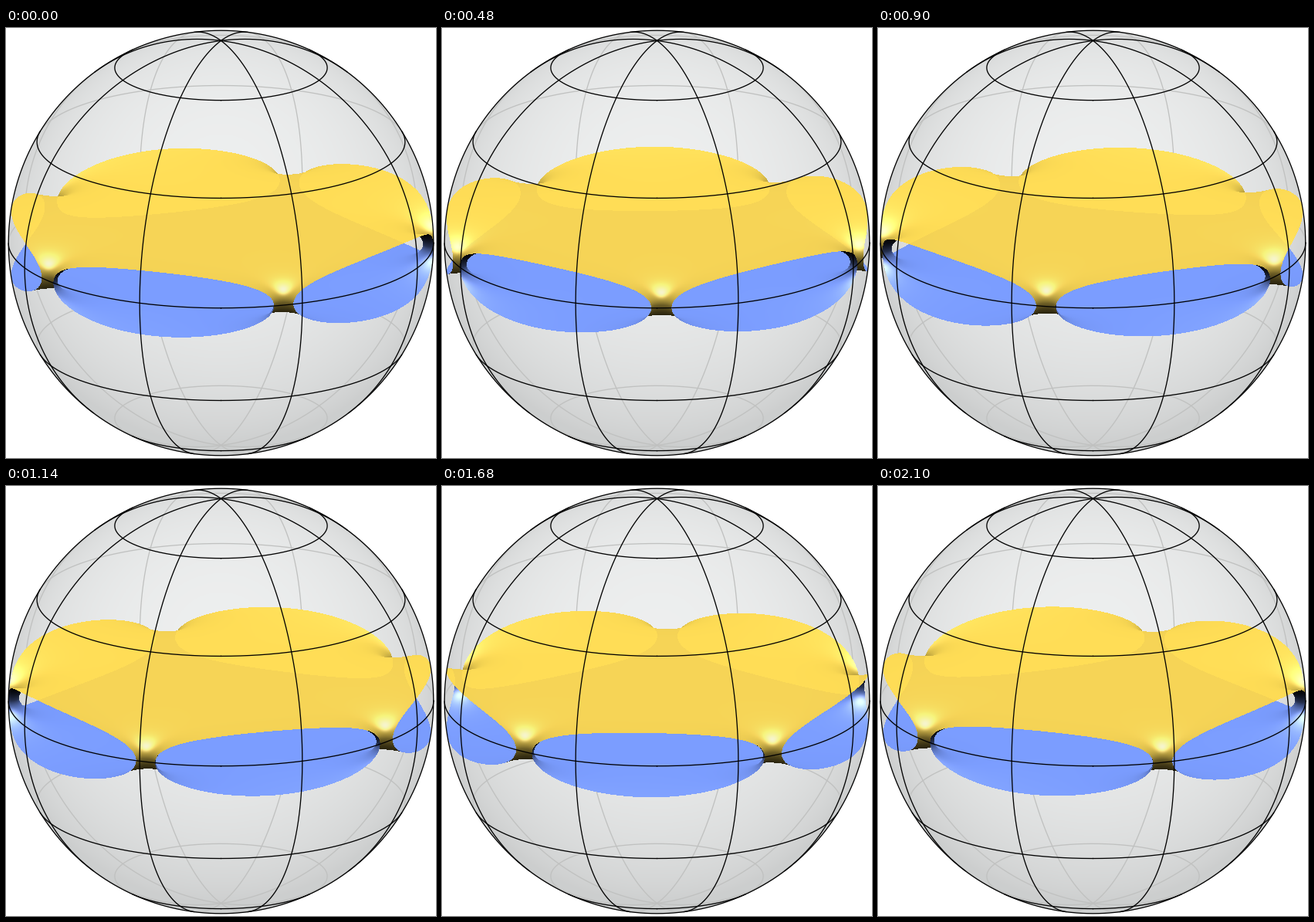
Animation of 557 by 557 pixels, one loop 2.16 s. Source, as a matplotlib script:

```python
import numpy as np
import matplotlib.pyplot as plt
from matplotlib.animation import FuncAnimation

SIZE, DPI = 557, 64
MID, RADIUS = 278.5, 275.3
SIN_E = 0.306                       # camera elevation
COS_E = np.sqrt(1 - SIN_E ** 2)
FRAMES, STEP_MS = 36, 60
TOP, BOTTOM = 140, 417              # pixel rows the surface can reach

N = 5                               # necks around the equator
NECK = 0.048                        # catenoid scale
SHIFT = -0.05
START, TURN = 17.2, -2.0            # neck azimuth and degrees per frame

YELLOW = np.array([255, 221, 86]) / 255
BLUE = np.array([123, 157, 255]) / 255
VIEW = np.array([0, -COS_E, SIN_E])
HALF = VIEW + [0, 0, 1]
HALF /= np.linalg.norm(HALF)

# Rays: X to the right, Y away from the camera, Z up
X = (np.arange(SIZE) + 0.5 - MID)[None, :] / RADIUS
V = (MID - np.arange(TOP, BOTTOM) - 0.5)[:, None] / RADIUS
inside = X ** 2 + V ** 2 < 1
reach = np.sqrt(np.clip(1 - X ** 2 - V ** 2, 0, None))
Y_in = V * SIN_E - reach * COS_E
Y_out = V * SIN_E + reach * COS_E
XX = np.broadcast_to(X, inside.shape)
VV = np.broadcast_to(V, inside.shape)


def height(v, y):
    return (v - y * SIN_E) / COS_E


def wall(z):
    return NECK * np.logaddexp(z / NECK, -z / NECK)


# Depth samples, shared by all rays of a row
STEP = 0.01
ys = np.arange(-1, 1 + STEP / 2, STEP)
STEPS = int(1.1 / STEP)
first_j = np.floor((V[:, 0] / SIN_E - 0.55 + 1) / STEP).astype(int)
index = first_j[None, :] + np.arange(STEPS)[:, None]
y_ray = -1 + index * STEP
wall_ray = wall(height(V[:, 0][None, :], y_ray))
index = np.clip(index, 0, len(ys) - 1)
valid = (y_ray[:, :, None] > Y_in) & (y_ray[:, :, None] < Y_out) & inside


def series(w):
    """Sum of w^(Nk) / (Nk - 1), with the logarithm split off."""
    q = w ** N
    total = np.zeros_like(q)
    for k in range(9, 0, -1):
        total = (total + 1 / (N * k * (N * k - 1))) * q
    return total - np.log(1 - q + 1e-12) / N


def potential(x, y, turn):
    """Half thickness of the doubled disc away from its necks."""
    f = series((x + 1j * y) / turn)
    return NECK * (N / 2 * (1 - 2 * f.real) + SHIFT)


def normal(x, y, z, turn):
    w = (x + 1j * y) / turn + 1e-9
    slope = series(w) / w + w ** (N - 1) / (1 - w ** N + 1e-12)
    grad = -N * NECK * np.conj(slope) * turn
    n = np.stack([-grad.real, -grad.imag, np.tanh(z / NECK)], axis=-1)
    return n / np.linalg.norm(n, axis=-1, keepdims=True)


def shade(n, base, ambient):
    up = n[:, 2]
    light = ambient + np.where(up > 0, 1 - ambient, 0.3) * up
    gloss = 0.5 * np.clip(n @ HALF, 0, 1) ** 25
    return np.clip(base * light[:, None] + gloss[:, None], 0, 1)


def render(i):
    turn = -1j * np.exp(1j * np.radians(START + TURN * i))
    grid = potential(X, ys[:, None], turn)

    def gap(x, v, y):
        return potential(x, y, turn) - wall(height(v, y))

    starts = gap(XX, VV, Y_in) > 0
    ends = gap(XX, VV, Y_out) > 0

    first = np.full(inside.shape, STEPS, dtype=np.uint8)
    for k in range(STEPS):
        flip = (grid[index[k]] > wall_ray[k][:, None]) != starts
        flip &= valid[k]
        first = np.minimum(first, np.where(flip, np.uint8(k), np.uint8(STEPS)))

    hit = inside & ((first < STEPS) | (starts != ends))
    rows, _ = np.nonzero(hit)
    k = first[hit].astype(int)
    x, v = XX[hit], VV[hit]
    y1 = np.where(k < STEPS, y_ray[np.minimum(k, STEPS - 1), rows], Y_out[hit])
    y0 = np.maximum(y1 - STEP, Y_in[hit])
    g0, g1 = gap(x, v, y0), gap(x, v, y1)
    diff = np.where(np.abs(g0 - g1) < 1e-9, 1e-9, g0 - g1)
    y = y0 + (y1 - y0) * np.clip(g0 / diff, 0, 1)

    n = normal(x, y, height(v, y), turn)
    inner = starts[hit]
    color = np.empty((len(x), 3))
    color[inner] = shade(-n[inner], BLUE, 0.3)
    color[~inner] = shade(n[~inner], YELLOW, 0.45)
    # The lower sheet shows faintly through the upper one
    double = ~inner & ~ends[hit]
    color[double] *= [0.965, 0.96, 1.0]

    image = np.zeros(inside.shape + (4,))
    image[hit, :3] = color
    image[hit, 3] = 1
    return image


def globe():
    p = (np.arange(SIZE) + 0.5 - MID) / RADIUS
    u, v = np.meshgrid(p, -p)
    rr = u ** 2 + v ** 2
    tone = 0.95 * np.sqrt(np.clip(1 - rr, 0, None)) + 0.3 * v
    tone = (206 + 33 * np.clip(tone, 0, 1)) / 255
    image = np.stack([tone - 0.006, tone, tone], axis=-1)
    image[rr > 1] = 1
    return image


fig = plt.figure(figsize=(SIZE / DPI, SIZE / DPI), dpi=DPI, facecolor="white")
ax = fig.add_axes([0, 0, 1, 1])
ax.axis("off")


def px(width):
    return width * 72 / DPI


def draw_curve(lat, lon):
    x = np.cos(lat) * np.sin(lon)
    y = -np.cos(lat) * np.cos(lon)
    z = np.sin(lat) + 0 * lon
    sx = MID + RADIUS * x
    sy = MID - RADIUS * (z * COS_E + y * SIN_E)
    front = y * COS_E - z * SIN_E < 0
    for mask, color, order in ((~front, "#c0c1c0", 1), (front, "black", 3)):
        ax.plot(sx, np.where(mask, sy, np.nan), color=color, lw=px(1.3),
                zorder=order)


ax.imshow(globe(), extent=(0, SIZE, SIZE, 0), interpolation="nearest", zorder=0)
around = np.linspace(0, 2 * np.pi, 721)
upward = np.linspace(-np.pi / 2, np.pi / 2, 361)
for deg in (-60, -30, 0, 30, 60):
    draw_curve(np.radians(deg), around)
for m in range(8):
    draw_curve(upward, np.radians(22.5 + 45 * m) + 0 * upward)
ax.plot(MID + RADIUS * np.cos(around), MID + RADIUS * np.sin(around),
        color="black", lw=px(1.3), zorder=4)

surface = ax.imshow(np.zeros(inside.shape + (4,)),
                    extent=(0, SIZE, BOTTOM, TOP),
                    interpolation="nearest", zorder=2)
ax.set_xlim(0, SIZE)
ax.set_ylim(SIZE, 0)
ax.set_aspect("auto")

cache = {}


def update(i):
    if i not in cache:
        cache[i] = render(i)
    surface.set_data(cache[i])
    return [surface]


anim = FuncAnimation(fig, update, frames=FRAMES, interval=STEP_MS,
                     init_func=lambda: [surface], repeat=True, repeat_delay=0)
plt.show()
```
